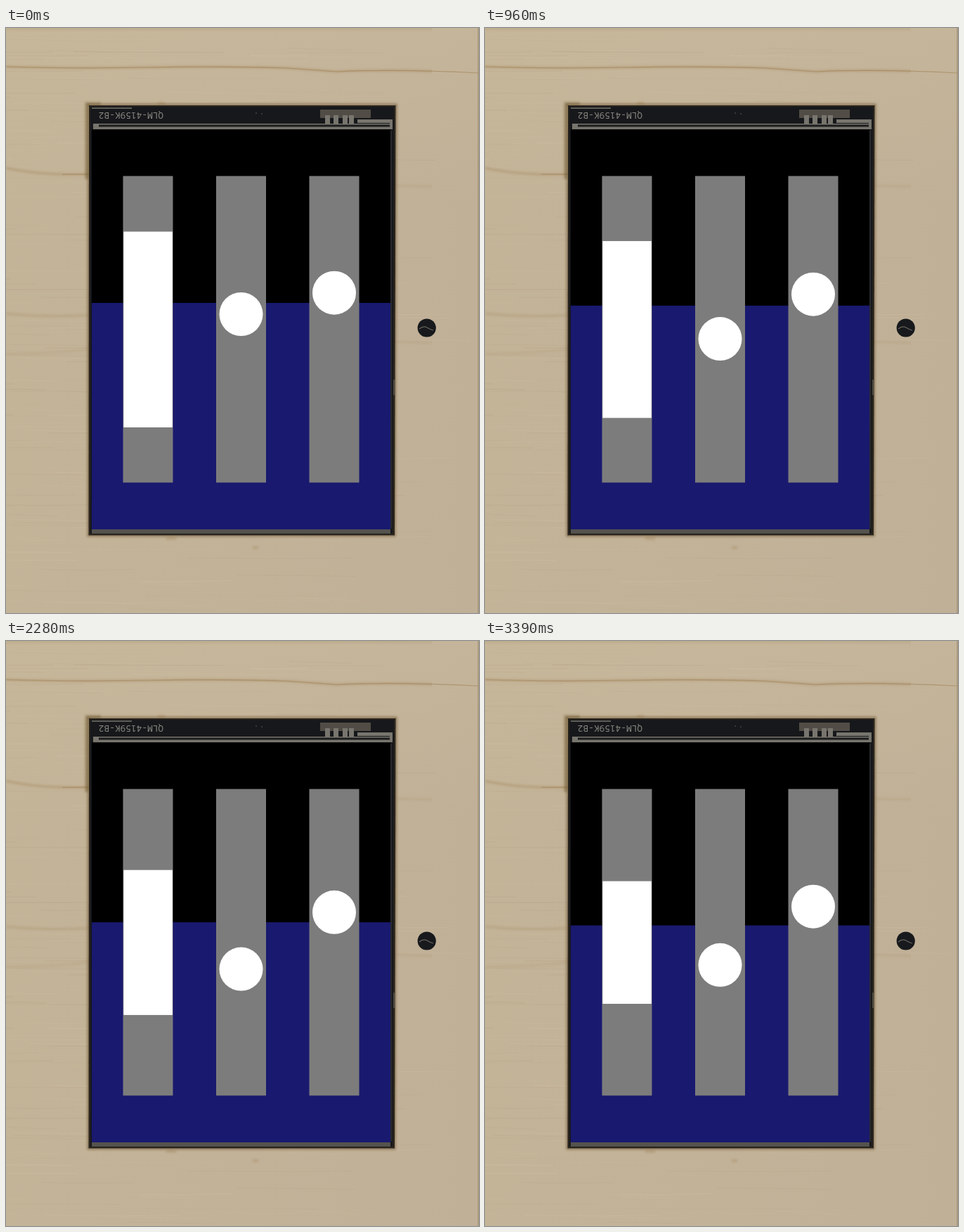
An HTML page for the animation above (3420 ms loop, 673 by 832 pixels).

```html
<!DOCTYPE html>
<html lang="en">
<head>
<meta charset="utf-8">
<title>Three sliders</title>
<style>
  html, body { margin: 0; width: 100%; height: 100%; overflow: hidden; background: #c1b298; }
  svg { display: block; width: 673px; height: 832px; }
  .label { font: 12.8px "Noto Sans Mono", monospace; fill: #85857f; }
  .grain path { fill: none; }
</style>
</head>
<body>
<svg viewBox="0 0 673 832">
  <defs>
    <linearGradient id="wood">
      <stop offset="0" stop-color="#c3b397"/>
      <stop offset=".5" stop-color="#c2b298"/>
      <stop offset="1" stop-color="#c0b097"/>
    </linearGradient>
    <linearGradient id="light" x2="0" y2="1">
      <stop offset="0" stop-color="#cdbd9f" stop-opacity=".35"/>
      <stop offset=".3" stop-color="#cdbd9f" stop-opacity="0"/>
    </linearGradient>
    <filter id="soft" filterUnits="userSpaceOnUse" width="673" height="832"><feGaussianBlur stdDeviation="1.5"/></filter>
    <filter id="edge" filterUnits="userSpaceOnUse" width="673" height="832"><feGaussianBlur stdDeviation=".5"/></filter>
  </defs>

  <rect width="673" height="832" fill="url(#wood)"/>
  <rect width="673" height="832" fill="url(#light)"/>
  <g id="grain" class="grain"></g>
  <g class="grain" stroke="#a08257">
    <g filter="url(#soft)" stroke-width="3" opacity=".4">
      <path d="M0 55 Q90 58 200 56 T400 57 L470 62 Q560 58 673 64"/>
      <path d="M0 199 Q50 210 118 208"/>
      <path d="M0 406 Q60 412 118 408" opacity=".6"/>
      <path d="M0 462 Q60 464 118 457" opacity=".4"/>
      <path d="M554 224 Q610 227 673 223" opacity=".4"/>
      <path d="M554 446 Q610 449 673 447" opacity=".4"/>
      <path d="M228 726h14M351 739h8M216 107h10M630 212v14"/>
      <path d="M0 1H673M0 831H673" opacity=".6"/>
    </g>
    <path d="M0 55 Q90 58 200 56 T400 57 L470 62 Q560 58 673 64" stroke-width="1.2" opacity=".6"/>
    <path d="M80 208H118" stroke-width="1.5" opacity=".5"/>
  </g>
  <path d="M672 0V832" stroke="#a39276" stroke-width="1.5"/>

  <g filter="url(#soft)" fill="none" stroke="#6b5230">
    <path d="M117 109H555L553 722H117Z" stroke-width="3" opacity=".6"/>
    <path d="M115 215V108H135" stroke-width="5" opacity=".45"/>
  </g>
  <path d="M118 110H554.5L553 721.5H117.5Z" fill="#29241c"/>
  <path d="M120 112H552L550 719H120Z" fill="#17181b"/>
  <path d="M122 114H179" stroke="#5d5d58" stroke-width="2"/>
  <text class="label" transform="translate(224 120) rotate(180)">QLM-4159K-B2</text>
  <g fill="#77756d" filter="url(#edge)">
    <path d="M447 116H519V128H447Z" fill="#514c45"/>
    <path d="M454 124h7v14h-7zM466 124h7v14h-7zM479 124h7v14h-7zM488 124h7v14h-7z"/>
    <path d="M500 130H550V144H546V135H500Z"/>
    <path d="M124 136H547V144H124Z"/>
    <path d="M132 139H546" stroke="#1d1d1f" stroke-width="3"/>
    <path d="M122 713H547V719H122Z" fill="#55534e"/>
  </g>
  <path d="M548 146V712" stroke="#3c3c43"/>
  <path d="M552 500V522" stroke="#77736b"/>
  <path d="M355 121h2M363 122h2" stroke="#555"/>

  <g filter="url(#edge)">
    <rect x="122" y="144.5" width="425" height="568.5"/>
    <rect id="water" x="122" width="425" fill="#19196f"/>
    <path d="M166.5 210.5h71v436h-71zM299 210.5h71v436h-71zM431.5 210.5h71v436h-71z" fill="#7c7c7c"/>
    <rect id="bar" x="167.3" width="69.6" fill="#fff"/>
    <circle id="mid" cx="334.5" r="31" fill="#fff"/>
    <circle id="right" cx="467" r="31" fill="#fff"/>
  </g>

  <circle cx="598.7" cy="426.5" r="13.1" fill="#17191c"/>
  <path d="M588 428q6-5 11-2t9 4" fill="none" stroke="#67645e" stroke-width="1.2"/>
</svg>
<script>
const LOOP = 3420, STEP = 30;
const TIMES = [0, 540, 1350, 1890, 2280, 2880, 3390];
const HALF = [139.2, 132.4, 119, 109.5, 103.1, 93.5, 87.2];
const MID = [407, 425.3, 455.8, 465.8, 466.6, 464, 460.8];
const RIGHT = [376.7, 376.3, 381.7, 385, 385.8, 383.3, 377.7];
const el = id => document.getElementById(id);

function set(id, attrs) {
  for (const key in attrs) el(id).setAttribute(key, attrs[key]);
}

// Slope through the neighbouring keys, one-sided at the ends.
function slope(v, i) {
  const last = v.length - 1;
  const rate = k => (v[k + 1] - v[k]) / (TIMES[k + 1] - TIMES[k]);
  if (i === 0) return 1.5 * rate(0) - .5 * slope(v, 1);
  if (i === last) return 1.5 * rate(last - 1) - .5 * slope(v, last - 1);
  const a = TIMES[i] - TIMES[i - 1], b = TIMES[i + 1] - TIMES[i];
  return (rate(i - 1) * b + rate(i) * a) / (a + b);
}

function curve(v, t) {
  let i = 0;
  while (i < v.length - 2 && t > TIMES[i + 1]) i++;
  const h = TIMES[i + 1] - TIMES[i], u = (t - TIMES[i]) / h, w = 1 - u;
  return w * w * ((1 + 2 * u) * v[i] + u * h * slope(v, i))
       + u * u * ((3 - 2 * u) * v[i + 1] - w * h * slope(v, i + 1));
}

function drawGrain() {
  let seed = 11, out = "";
  const rnd = () => (seed = seed * 16807 % 2147483647) / 2147483647;
  for (let i = 0; i < 260; i++) {
    const x = rnd() * 620 - 200, y = rnd() * 832, len = 60 + rnd() * 200;
    const color = rnd() < .5 ? "#a8977a" : "#d6c7ab";
    out += `<path d="M${x} ${y}q${len / 2} ${rnd() * 4 - 1} ${len} ${rnd() * 4 - 1}"
      stroke="${color}" stroke-width="${.6 + rnd()}" opacity="${.08 + rnd() * .14}"/>`;
  }
  el("grain").innerHTML = out;
}

function draw(t) {
  const level = 391 + 13.5 * t / 3390, half = curve(HALF, t);
  set("water", { y: level, height: 713 - level });
  set("bar", { y: 428.8 - half, height: 2 * half });
  set("mid", { cy: curve(MID, t) });
  set("right", { cy: curve(RIGHT, t) });
}

const start = performance.now();
function tick() {
  const t = (performance.now() - start) % LOOP;
  draw(Math.floor(t / STEP) * STEP);
  requestAnimationFrame(tick);
}
drawGrain();
tick();
</script>
</body>
</html>
```
